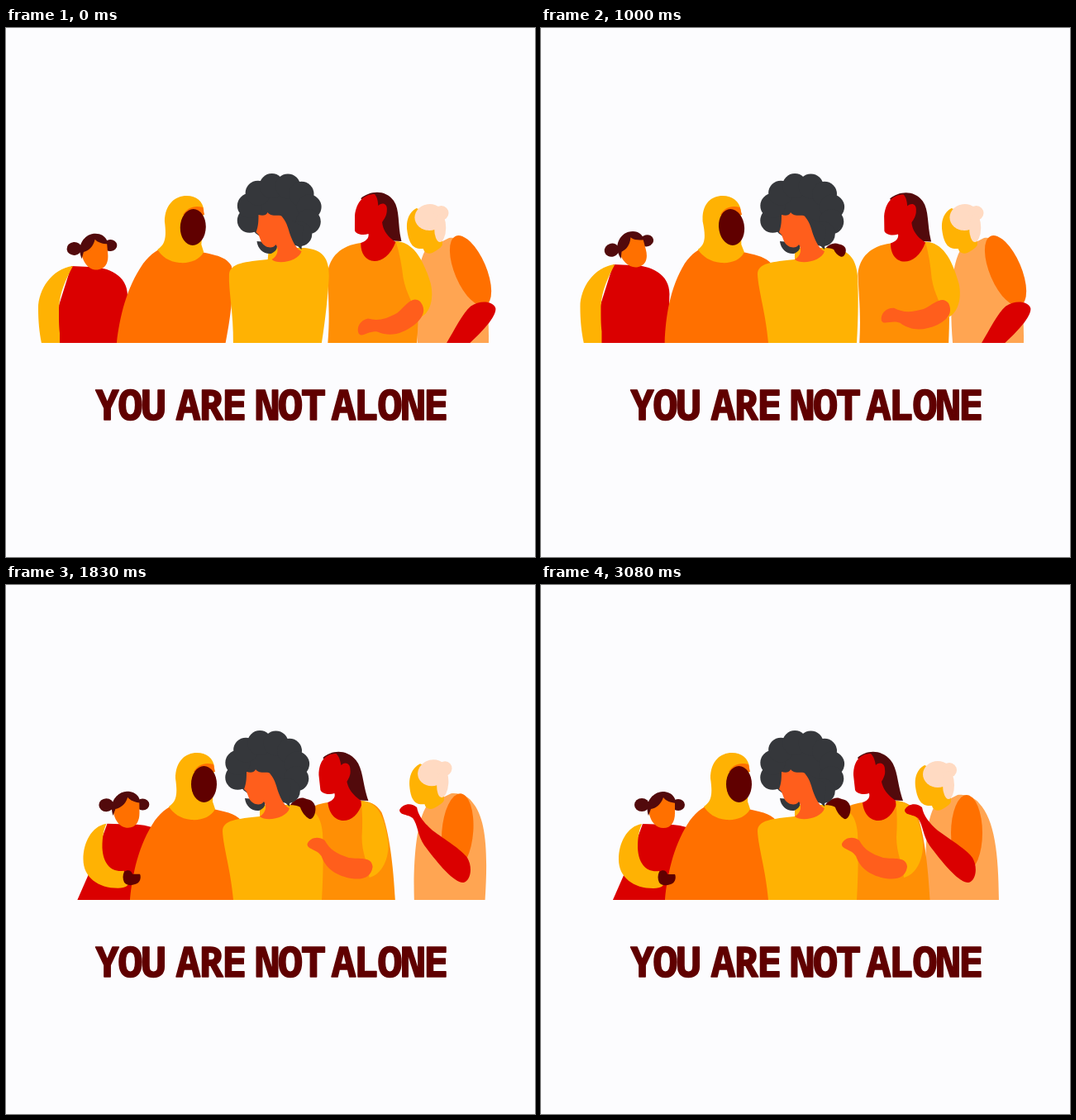
An HTML page that plays this animation: 640 px wide and 640 px high, repeating every 3160 ms.

```html
<!DOCTYPE html>
<html lang="en">
<head>
<meta charset="utf-8">
<title>You are not alone</title>
<style>
  html, body { margin: 0; width: 100%; height: 100%; overflow: hidden; background: #fcfcfe; }
  svg { display: block; width: 100%; height: 100%; }
  .maroon { fill: #600000; }
  .red { fill: #da0000; }
  .orange { fill: #ff7000; }
  .rust { fill: #ff5e1c; }
  .yellow { fill: #ffb203; }
  .amber { fill: #ff8f05; }
  .peach { fill: #ffa552; }
  .cream { fill: #ffdac2; }
  .slate { fill: #35373b; }
  .brown { fill: #520a0c; }
  text {
    font: 700 50px "Noto Sans Mono", monospace;
    letter-spacing: -2px;
    text-anchor: middle;
    fill: #600000;
    stroke: #600000;
    stroke-width: 1.5;
    stroke-linejoin: round;
  }
</style>
</head>
<body>
<svg viewBox="0 0 640 640">
  <clipPath id="ground"><rect width="640" height="381"/></clipPath>
  <g clip-path="url(#ground)">
    <g id="elder">
      <path class="peach" d="M476 268C463 290 464 345 469 390L554 390C554 330 550 285 530 264C524 256 512 253 504 254Z"/>
      <path class="yellow" d="M464 218C453 224 452 236 453 244C455 258 459 266 468 267L473 267C474 272 480 274 484 272C492 268 496 264 496 262L494 230Z"/>
      <g class="cream">
        <ellipse cx="480" cy="229" rx="18" ry="16"/>
        <circle cx="494" cy="224" r="9"/>
        <ellipse cx="493" cy="242" rx="7" ry="17"/>
      </g>
      <ellipse id="elderSleeve" class="orange" cx="515" cy="300" rx="19" ry="46"/>
    </g>

    <g id="friend">
      <path class="amber" d="M390 263C366 266 354 280 354 300C358 330 363 350 364 390L472 390C470 345 465 300 455 275C448 264 440 262 430 261Z"/>
      <path class="brown" d="M384 209C394 200 412 198 424 212C433 223 432 242 439 261L420 260L400 235Z"/>
      <path class="red" d="M379 230C379 212 388 204 400 204C404 208 405 213 406 218C411 213 417 216 417 223C418 230 415 234 413 238C415 248 422 256 432 262C428 278 418 285 409 285C398 285 391 275 390 263C398 260 399 256 398 252C392 254 383 253 381 248Z"/>
    </g>
    <path id="friendSleeve" class="yellow" d="M430 261C450 262 459 280 463 312C464 330 456 350 440 354C438 335 431 325 431 305C432 290 432 275 430 261Z"/>

    <g id="girl">
      <path id="girlDress" class="red"/>
      <path id="girlArm" class="yellow"/>
    </g>
    <g id="girlHead">
      <ellipse class="brown" cx="-22" rx="9" ry="8"/>
      <ellipse class="brown" cx="22" rx="8" ry="7"/>
      <path class="orange" d="M-14 2C-14 18 -6 28 4 28C14 28 18 20 18 10L18 -6L3 -12Z"/>
      <path class="brown" d="M-14 13C-20 -6 -6 -16 3 -16C14 -16 19 -9 19 -2C12 -3 7 -5 4 -9C1 0 -5 4 -11 5Z"/>
    </g>

    <g id="mother">
      <path class="orange" d="M150 390L150 380C153 350 160 315 180 285C190 272 198 267 208 265L246 270C264 274 280 276 287 288C291 312 288 348 280 390Z"/>
      <path class="yellow" d="M205 234C205 213 217 203 231 203C243 203 251 210 252 220L250 262L253 271C248 281 236 285 224 284C211 283 202 276 197 268C206 262 208 254 205 234Z"/>
      <path class="orange" d="M227 226C232 217 241 214 251 217L253 226Z"/>
      <ellipse class="maroon" cx="239.500" cy="241" rx="15.500" ry="22"/>
    </g>

    <path id="middle" class="yellow" d="M307 280C280 283 262 284 262 298C263 318 272 345 275 381L382 381C384 350 384 320 383 300C381 278 372 268 350 266L307 266Z"/>
    <path id="motherHand" class="maroon" d="M-3 0C2 -7 10 -11 17 -7C25 -6 29 1 27 9C26 14 23 18 20 17C15 14 11 9 9 3C5 0 1 1 -3 0Z"/>
    <g id="middleHead">
      <g id="curls" class="slate"><ellipse cx="316" cy="223" rx="40" ry="36"/></g>
      <path class="slate" d="M289 258C290 268 298 274 306 273C312 271 315 266 313 260ZM318 226L345 240L343 268C335 263 328 245 318 226Z"/>
      <path class="rust" d="M291 226C297 228 301 226 302 223C307 230 318 224 320 229C326 236 327 244 330 252C334 262 338 268 343 270C340 282 315 287 307 280C314 276 316 268 312 262C308 268 298 266 294 258L291 250L288 247C291 240 291 232 291 226Z"/>
    </g>

    <path id="girlHand" class="maroon" d="M143 347C147 344 152 345 153 350L162 350C164 354 162 361 157 362C151 364 146 364 143 360C141 356 141 351 143 347Z"/>
    <path id="friendArm" class="rust" d="M365 313C368 306 378 303 386 309C392 320 400 325 415 330C428 332 443 328 444 341C442 354 432 357 418 355C402 352 388 345 382 328C376 319 364 320 365 313Z"/>
    <path id="elderArm" class="red" d="M440 272C444 264 455 263 461 269C463 280 470 288 480 297C495 308 515 320 522 330C529 342 526 358 517 360C505 360 485 335 470 315C462 303 462 290 456 282C450 277 440 279 440 272Z"/>
  </g>
  <text x="149.500" y="474">YOU</text>
  <text x="247.500" y="474">ARE</text>
  <text x="343" y="474">NOT</text>
  <text x="463.500" y="474">ALONE</text>
</svg>
<script>
const LOOP = 3160;
const LAST = 3080;
const $ = id => document.getElementById(id);
const place = (id, transform) => $(id).setAttribute('transform', transform);
const mix = (a, b, k) => a + (b - a) * k;

const armDown = 'M135 289C109 292 93 318 93 340C93 360 95 374 99 392C103 398 115 398 119 392L119 370C118 360 118 355 118 340C119 320 127 304 135 289Z';
const armRound = 'M122 289C104 292 94 312 94 332C94 354 112 367 136 367C146 367 150 363 149 358L143 346C128 348 118 338 117 318C117 304 119 296 122 289Z';

function morph(from, to, k) {
  const ends = to.match(/[\d.]+/g);
  let i = 0;
  return from.replace(/[\d.]+/g, n => mix(+n, +ends[i++], k));
}

// Ring of curls from the left cheek over the crown to the right cheek.
const CURLS = 9;
for (let i = 0; i < CURLS; i++) {
  const angle = mix(165, 408, i / (CURLS - 1)) * Math.PI / 180;
  $('curls').innerHTML +=
    `<circle cx="${316 + 37 * Math.cos(angle)}" cy="${224 + 34 * Math.sin(angle)}" r="15"/>`;
}

function ease(t, start, end) {
  const u = Math.min(1, Math.max(0, (t - start) / (end - start)));
  return u * u * (3 - 2 * u);
}

// Shifts the foot line (y = 380) by foot and head height (y = 230) by head.
function lean(id, foot, head, dy = 0) {
  const c = (head - foot) / 150;
  place(id, `matrix(1 0 ${-c} 1 ${foot + 380 * c} ${dy})`);
}

function drawGirl(t, away) {
  const x = -54 * away;
  const hug = ease(t, 1100, 1750);
  const tilt = -5 - 10 * ease(t, 0, 700) + 15 * ease(t, 1400, 1900);
  const y = tilt * .2;
  place('girl', `translate(${x} ${y})`);
  $('girlDress').setAttribute('d', `M${133 - 10 * hug} 289L155 290C178 290 201 300 201 325L199 390` +
    `L${115 - 32 * hug} 390L${114 - 13 * hug} 349Z`);
  $('girlArm').setAttribute('d', morph(armDown, armRound, hug));
  place('girlHead', `translate(${144 + x * .7 + tilt * .35} ${266 + y}) rotate(${tilt})`);
  place('girlHand', `translate(${-30 * (1 - hug)} ${y + 70 * (1 - hug)})`);
}

function drawCentre(t) {
  lean('mother', -16 * (1 - ease(t, 0, 1100)), -13 * (1 - ease(t, 750, 1500)));
  const reach = ease(t, 500, 1350);
  place('motherHand', `translate(347 266) scale(${Math.sqrt(reach)} ${reach})`);
  const sway = 14.5 * (1 - ease(t, 0, 900));
  lean('middle', 0, sway);
  place('middleHead', `translate(${sway} 0)`);
}

function drawFriend(t, away) {
  const y = -3 * away;
  lean('friend', 27 * away - 1, 44 * away - 1, y);
  lean('friendSleeve', 64 * away - 1, 37 * away - 1, y);
  place('friendArm', `translate(${62 * away - 1} ${y}) rotate(${-47 * (1 - ease(t, 600, 1750))} 434 342)`);
}

function drawElder(t) {
  const lowered = 1 - ease(t, 1300, 1830);
  const away = 1 - ease(t, 1500, 2900);
  const foot = 30 * away;
  const head = foot + 12 * away * (1 - .8 * lowered);
  lean('elder', foot, head, -2 * away * (1 - lowered));
  place('elderSleeve', `rotate(${-24 * lowered} 508 260)`);
  place('elderArm', `translate(${head + 33 * lowered} ${-10 * lowered}) rotate(${-95 * lowered} 517 350)`);
}

function draw(t) {
  const away = 1 - ease(t, 700, 1900);
  drawGirl(t, away);
  drawCentre(t);
  drawFriend(t, away);
  drawElder(t);
}

// The picture advances twelve times a second, on 10 ms ticks.
const stepStart = n => Math.round(n * 25 / 3) * 10;

function frame(now) {
  const t = now % LOOP;
  let n = Math.floor(t * .012 + .5);
  if (stepStart(n) > t) n--;
  draw(Math.min(stepStart(n), LAST));
  requestAnimationFrame(frame);
}

draw(0);
requestAnimationFrame(frame);
</script>
</body>
</html>
```
